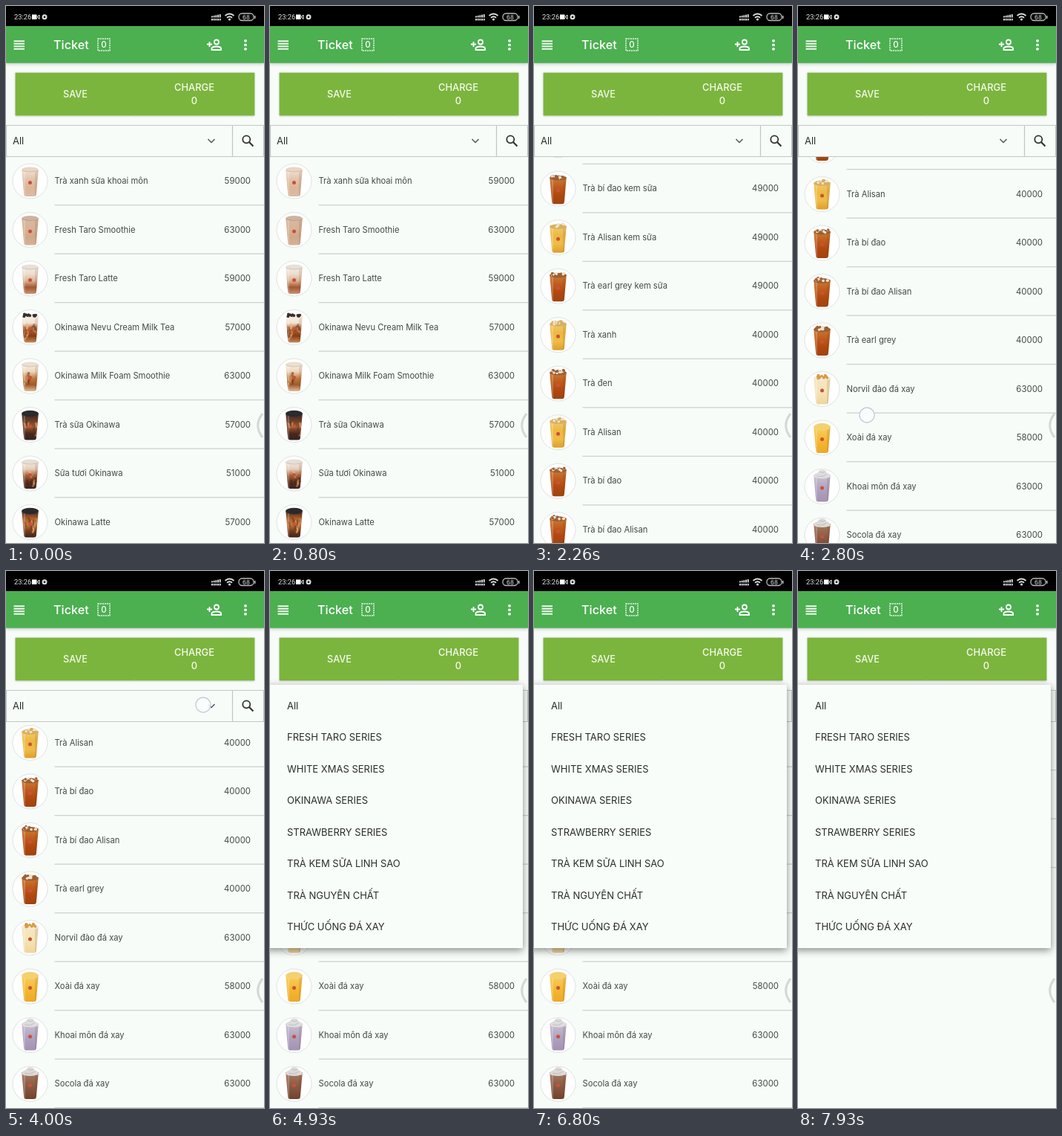
Write an HTML page with a canvas that moves like this. It is 348 by 722 pixels and loops after 8 s.

```html
<!DOCTYPE html>
<html lang="vi">
<head>
<meta charset="utf-8">
<title>Ticket</title>
<style>
html, body { margin: 0; width: 100%; height: 100%; overflow: hidden; background: #f7fcf8; }
canvas { display: block; width: 348px; height: 722px; }
</style>
</head>
<body>
<canvas></canvas>
<script>
const W = 348, H = 722, LOOP = 8000;
const canvas = document.querySelector('canvas');
const ctx = canvas.getContext('2d');
const dpr = window.devicePixelRatio || 1;
canvas.width = W * dpr;
canvas.height = H * dpr;

const BG = '#f7fcf8', GREEN = '#4caf50', LIME = '#7cb53d', LINE = '#cfd2cf';
const ROW = 65.5, FIRST_ROW = 235, LIST_TOP = 203;
const MENU_OPEN = 4400, FILTERED = 7900;

// Cup looks: gradient from rim to base, topping style and topping colour
const CUPS = {
  taro: { body: ['#f0e0d2', '#e2c4ad', '#dcb597', '#d9bba6'], top: 'foam', cap: '#e8d6c6' },
  smoothie: { body: ['#d6b8a2', '#d8b498', '#d0a88a', '#d3b298'], top: 'foam', cap: '#cdb3a2' },
  latte: { body: ['#f1ebe4', '#ecdccd', '#dcb294', '#a35532', '#c79474'], top: 'foam', cap: '#e6e0d8' },
  cookie: { body: ['#f8f2ea', '#f2e2cf', '#ad5c28', '#8a3d16', '#c48a55'], top: 'pearls', cap: '#38302e', streaks: true },
  cream: { body: ['#f6efe5', '#ecd5b8', '#bf7a40', '#a25a2b', '#dfc09c'], top: 'foam', cap: '#eae0d2', streaks: true },
  dark: { body: ['#35292a', '#6b3c25', '#9a5a33', '#4c281c', '#2e2222'], top: 'lid', cap: '#2b2a2d', streaks: true },
  fresh: { body: ['#f0e8e0', '#e3cdb9', '#a2603a', '#5d2f1e', '#3a2420'], top: 'foam', cap: '#e6ded6', streaks: true },
  amber: { body: ['#3a2a24', '#a75a28', '#c47a3c', '#7a3c1c', '#3a241c'], top: 'lid', cap: '#2c292b', streaks: true },
  berry: { body: ['#fbeeee', '#efa9ac', '#d65560'], top: 'whip', cap: '#f4ecec' },
  gold: { body: ['#efcb72', '#edb940', '#eebc48', '#dd9f2c'], top: 'ice', cap: '#d8b060' },
  tea: { body: ['#cd7a35', '#bf5c1c', '#b0480f', '#a0430f'], top: 'ice', cap: '#9c5f34' },
  peach: { body: ['#f6e6bd', '#f6e4b8', '#efd59d'], top: 'pearls', cap: '#dd9a3d' },
  mango: { body: ['#f8cf63', '#f5b932', '#eca929'], top: 'dome', cap: '#f5d070' },
  lilac: { body: ['#c9bfd2', '#b0a2bf', '#a393b3'], top: 'whip', cap: '#dddde0' },
  cocoa: { body: ['#a5785f', '#8a5a43', '#70432f'], top: 'whip', cap: '#dcdad8' }
};

const ITEMS = [
  ['Trà xanh sữa khoai môn', 59000, 'taro'],
  ['Fresh Taro Smoothie', 63000, 'smoothie'],
  ['Fresh Taro Latte', 59000, 'latte'],
  ['Okinawa Nevu Cream Milk Tea', 57000, 'cookie'],
  ['Okinawa Milk Foam Smoothie', 63000, 'cream'],
  ['Trà sữa Okinawa', 57000, 'dark'],
  ['Sữa tươi Okinawa', 51000, 'fresh'],
  ['Okinawa Latte', 57000, 'amber'],
  ['White Xmas Latte', 59000, 'latte'],
  ['White Xmas Smoothie', 63000, 'cream'],
  ['Strawberry Milk Tea', 57000, 'berry'],
  ['Strawberry Latte', 59000, 'berry'],
  ['Strawberry Smoothie', 63000, 'berry'],
  ['Trà xanh kem sữa', 49000, 'gold'],
  ['Trà đen kem sữa', 49000, 'tea'],
  ['Trà bí đao kem sữa', 49000, 'tea'],
  ['Trà Alisan kem sữa', 49000, 'gold'],
  ['Trà earl grey kem sữa', 49000, 'tea'],
  ['Trà xanh', 40000, 'gold'],
  ['Trà đen', 40000, 'tea'],
  ['Trà Alisan', 40000, 'gold'],
  ['Trà bí đao', 40000, 'tea'],
  ['Trà bí đao Alisan', 40000, 'tea'],
  ['Trà earl grey', 40000, 'tea'],
  ['Norvil đào đá xay', 63000, 'peach'],
  ['Xoài đá xay', 58000, 'mango'],
  ['Khoai môn đá xay', 63000, 'lilac'],
  ['Socola đá xay', 63000, 'cocoa']
];
const MENU = ['All', 'FRESH TARO SERIES', 'WHITE XMAS SERIES', 'OKINAWA SERIES',
  'STRAWBERRY SERIES', 'TRÀ KEM SỮA LINH SAO', 'TRÀ NGUYÊN CHẤT', 'THỨC UỐNG ĐÁ XAY'];
const MAX_SCROLL = ITEMS.length * ROW + LIST_TOP - H - 0.5;
const LAST_SWIPE = 72;

// Each touch: start, end, from point, to point, time the finger starts to move
const TOUCHES = [
  [1620, 1860, 86, 497, 92, 330, 1690],
  [2700, 2950, 93, 600, 93, 428, 2740],
  [3860, 4230, 266, 180, 266, 180, 3860],
  [7560, 7770, 96, 224, 96, 224, 7560]
];

const clamp = v => Math.max(0, Math.min(1, v));
const ramp = (t, a, b) => clamp((t - a) / (b - a));
const mix = (a, b, k) => a + (b - a) * k;

function scrollAt(t) {
  if (t >= FILTERED) return 0;
  const beforeSwipe = MAX_SCROLL - LAST_SWIPE;
  if (t >= 2740) return Math.min(MAX_SCROLL, beforeSwipe + (t - 2740) * 0.82);
  const drag = 167 * ramp(t, 1690, 1860);
  const fling = 1 - (1 - ramp(t, 1860, 2720)) ** 2.2;
  return mix(drag, beforeSwipe, fling);
}

function rect(x, y, w, h, color) {
  ctx.fillStyle = color;
  ctx.fillRect(x, y, w, h);
}

function circle(x, y, r, fill, stroke, width = 1) {
  ctx.beginPath();
  ctx.arc(x, y, r, 0, Math.PI * 2);
  if (fill) { ctx.fillStyle = fill; ctx.fill(); }
  if (stroke) { ctx.strokeStyle = stroke; ctx.lineWidth = width; ctx.stroke(); }
}

function ellipse(x, y, rx, ry, color) {
  ctx.beginPath();
  ctx.ellipse(x, y, rx, ry, 0, 0, Math.PI * 2);
  ctx.fillStyle = color;
  ctx.fill();
}

function stroke(d, color, width) {
  ctx.strokeStyle = color;
  ctx.lineWidth = width;
  ctx.stroke(new Path2D(d));
}

function text(str, x, y, size, color, align = 'left', weight = 400, family = 'Inter') {
  ctx.font = `${weight} ${size}px ${family}, sans-serif`;
  ctx.textAlign = align;
  ctx.fillStyle = color;
  ctx.fillText(str, x, y);
}

function shadowed(blur, offset, alpha, paint) {
  ctx.save();
  ctx.shadowColor = `rgba(0,0,0,${alpha})`;
  ctx.shadowBlur = blur * dpr;
  ctx.shadowOffsetY = offset * dpr;
  paint();
  ctx.restore();
}

function randomFrom(seed) {
  return () => (seed = (seed * 16807) % 2147483647) / 2147483647;
}

function drawTopping(style, cap, random) {
  if (style === 'whip') {
    ctx.fillStyle = cap;
    ctx.fill(new Path2D('M-11-12Q-11.500-17-6-18Q-4-22 0-22Q5-22 6-18Q11.500-17 11-12Q0-8-11-12Z'));
    stroke('M-7-14Q0-11 6-16M-3-19Q1-17 4-19', '#b9b6b8', 0.8);
  } else if (style === 'foam') {
    ellipse(0, -15, 11.3, 3.6, cap);
    stroke('M-11-14Q0-10 11-14', 'rgba(130,85,50,.25)', 0.8);
  } else if (style === 'dome') {
    ellipse(0, -14, 11, 5, cap);
  } else if (style === 'lid') {
    ellipse(0, -14.5, 11.3, 4.2, cap);
  } else {
    ellipse(0, -14, 11.3, 3.4, style === 'ice' ? cap : '#f3e9dc');
    for (let i = 0; i < 15; i++) {
      const x = mix(-8.5, 8.5, random()), y = mix(-18, -13.5, random());
      circle(x, y, 1.8, style === 'ice' && i % 2 ? '#f0e2cb' : cap);
    }
  }
}

function drawCup(look, x, y, seed) {
  const { body, top, cap, streaks } = CUPS[look];
  const random = randomFrom(seed * 977 + 131);
  ctx.save();
  ctx.translate(x, y);
  const cup = new Path2D('M-11.300-15L11.300-15L8.300 18.500Q8 21 5 21H-5Q-8 21-8.300 18.500Z');
  const shade = ctx.createLinearGradient(0, -14, 0, 21);
  body.forEach((color, i) => shade.addColorStop(i / (body.length - 1), color));
  ctx.fillStyle = shade;
  ctx.fill(cup);

  ctx.save();
  ctx.clip(cup);
  if (streaks) {
    for (let i = 0; i < 10; i++) {
      const sx = mix(-9, 9, random()), sy = mix(-6, 12, random());
      stroke(`M${sx} ${sy}q${mix(-4, 4, random())} 3 ${mix(-3, 3, random())} 7`,
        i % 2 ? 'rgba(235,185,130,.45)' : 'rgba(75,32,15,.4)', 2.4);
    }
  }
  rect(-9, -14, 2.5, 36, 'rgba(255,255,255,.2)');
  rect(6.5, -14, 5, 36, 'rgba(90,50,20,.12)');
  ctx.restore();

  drawTopping(top, cap, random);
  circle(0, 2.5, 2.5, '#c9523a');
  ctx.restore();
}

function drawList(t) {
  const scroll = scrollAt(t);
  const items = t < FILTERED ? ITEMS : ITEMS.slice(0, 3);
  ctx.save();
  ctx.beginPath();
  ctx.rect(0, LIST_TOP, W, H - LIST_TOP);
  ctx.clip();
  items.forEach(([name, price, look], i) => {
    const y = FIRST_ROW + i * ROW - scroll;
    if (y < LIST_TOP - 40 || y > H + 40) return;
    circle(32.5, y + 0.5, 23.5, '#fff', '#e0e3e1');
    drawCup(look, 32.5, y, i + 1);
    text(name, 65.5, y + 4.2, 11.2, '#454846');
    text(price, 330, y + 4.2, 11.4, '#454846', 'right');
    rect(65.5, y + 32, W, 1.3, LINE);
  });
  ctx.restore();
}

function drawStatusBar() {
  rect(0, 0, W, 27, '#000');
  text('23:26', 11, 18.2, 9.3, '#e4e4e4', 'left', 400, 'Roboto');
  rect(35, 11.5, 6.5, 6.5, '#fff');
  stroke('M42 14.700L45 12V17.500Z', '#fff', 1);
  circle(52, 14.8, 2.4, null, '#ddd', 2.2);
  for (let i = 0; i < 5; i++) {
    rect(277 + i * 2.7, 13.5 - i * 0.6, 1.9, 2 + i * 0.6, '#ddd');
    rect(277 + i * 2.7, 17, 1.9, 2.5, '#ddd');
  }
  stroke('M295.500 13Q301.500 8 307.500 13M298 15.800Q301.500 12.500 305 15.800', '#ddd', 1.9);
  circle(301.5, 18, 1.6, '#ddd');
  ctx.beginPath();
  ctx.roundRect(314, 10, 20, 9.5, 4.5);
  ctx.strokeStyle = '#bbb';
  ctx.lineWidth = 1.3;
  ctx.stroke();
  rect(335, 13, 1.5, 4, '#bbb');
  text('68', 324, 17.7, 8, '#ddd', 'center');
}

function drawHeader() {
  shadowed(5, 1.5, 0.28, () => rect(0, 27, W, 49.7, GREEN));
  drawStatusBar();
  for (let i = 0; i < 4; i++) rect(10.5, 46.3 + i * 3.5, 14.5, 1.9, '#f4fbf4');
  text('Ticket', 64, 57.9, 16.2, '#fff', 'left', 500);
  ctx.setLineDash([2.2, 0.8]);
  stroke('M124 44H140V60H124Z', '#dff1df', 1.4);
  ctx.setLineDash([]);
  text('0', 132, 56.2, 11.5, '#fff', 'center', 500);
  stroke('M271 51.500H278M274.500 48V55', '#fff', 1.8);
  circle(284, 48.5, 3, null, '#fff', 1.9);
  stroke('M277.500 59V57Q278 54.500 284 54.500Q289.500 54.500 290 57V59Z', '#fff', 1.9);
  for (const y of [46.8, 52.3, 57.8]) circle(323, y, 1.9, '#fff');
}

function drawButtons() {
  shadowed(2.5, 0.5, 0.25, () => rect(12.6, 89.7, 322.8, 57.6, LIME));
  rect(173.5, 146, 1, 2, '#a5c97c');
  text('SAVE', 93.5, 122.6, 12.7, '#f5faef', 'center', 500);
  text('CHARGE', 254, 114.4, 12.9, '#f5faef', 'center', 500);
  text('0', 254, 131.8, 12.9, '#f5faef', 'center', 500);
}

function drawFilter() {
  rect(0, 160, W, 43, BG);
  stroke('M.5 160.500H347.500V202.500H.5ZM305.500 160V203', '#c3c7c4', 1.2);
  text('All', 9, 186, 13, '#2b2d2c');
  stroke('M272.500 179L277 183.500L281.500 179', '#555', 1.5);
  circle(324.3, 179.3, 5, null, '#333', 1.8);
  stroke('M328 183L333.500 188.500', '#333', 2.2);
}

function drawMenu(t) {
  const alpha = ramp(t, MENU_OPEN, MENU_OPEN + 160);
  if (!alpha) return;
  ctx.save();
  ctx.globalAlpha = alpha;
  shadowed(10, 3, 0.45, () => rect(-6, 153, 347, 354, '#f8fdf9'));
  MENU.forEach((label, i) => text(label, 23, 186 + i * 42.45, 13, '#2b2d2c'));
  ctx.restore();
}

function drawTouches(t) {
  for (const [start, end, x0, y0, x1, y1, moveStart] of TOUCHES) {
    const alpha = Math.min(ramp(t, start, start + 70), 1 - ramp(t, end, end + 90));
    if (!alpha) continue;
    const k = ramp(t, moveStart, end);
    ctx.globalAlpha = alpha;
    circle(mix(x0, x1, k), mix(y0, y1, k), 10, 'rgba(250,252,253,.93)', '#c9cdd6', 1.4);
    ctx.globalAlpha = 1;
  }
}

function draw(now) {
  const t = now % LOOP;
  ctx.setTransform(dpr, 0, 0, dpr, 0, 0);
  rect(0, 0, W, H, BG);
  drawList(t);
  drawFilter();
  drawButtons();
  drawHeader();
  drawMenu(t);
  stroke('M346 548Q333.500 564 346 580', '#d4d8d5', 3);
  drawTouches(t);
}

const begin = performance.now();
function tick() {
  draw(performance.now() - begin);
  requestAnimationFrame(tick);
}
tick();
</script>
</body>
</html>
```
